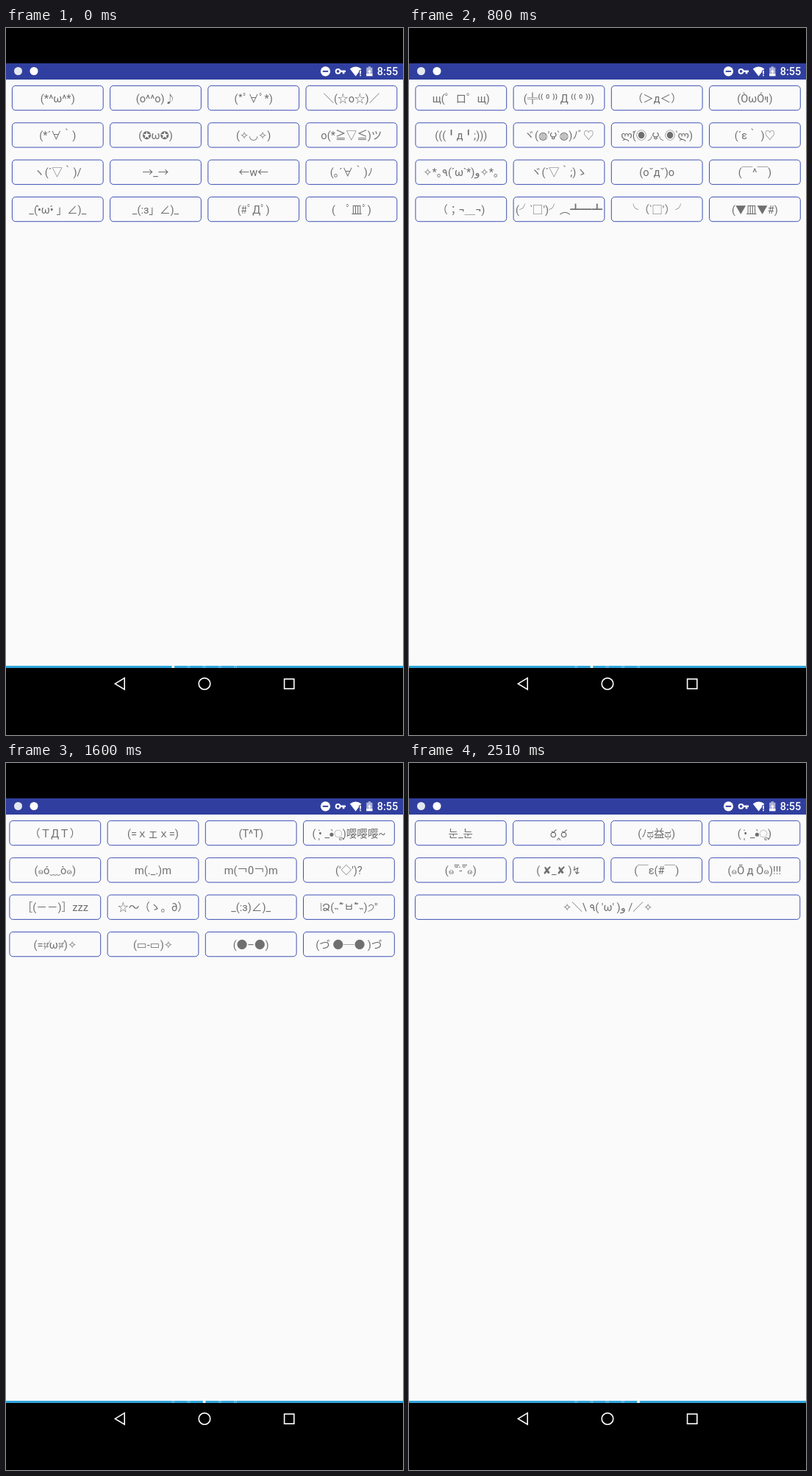
Animation of 540 by 960 pixels, one loop 2.54 s. Source, as an HTML page:

```html
<!DOCTYPE html>
<html lang="en">
<head>
<meta charset="utf-8">
<title>Emoticon pager</title>
<style>
  html, body { margin: 0; width: 100%; height: 100%; overflow: hidden; background: #000; }
  svg { display: block; width: 540px; height: 960px; }
  text { font-family: Roboto, "Noto Sans CJK JP", "Noto Sans CJK SC", "Noto Sans", "DejaVu Sans", sans-serif; }
  .face { font-size: 14.6px; fill: #6f6f70; text-anchor: middle; direction: ltr; unicode-bidi: bidi-override; white-space: pre; }
  .box { fill: none; stroke: #3f51b5; stroke-width: 1; }
  .dot { fill: none; stroke: #fff; stroke-width: .7; stroke-opacity: .55; }
  .dot.on { fill: #fff; stroke-opacity: 1; }
  .nav { fill: none; stroke: #fff; stroke-width: 1.6; }
</style>
</head>
<body>
<svg viewBox="0 0 540 960">
  <clipPath id="barClip"><rect y="866" width="540" height="3"/></clipPath>
  <rect width="540" height="960"/>
  <rect y="70" width="540" height="796" fill="#fafafa"/>
  <g id="pages"></g>

  <rect y="48" width="540" height="22" fill="#303f9f"/>
  <g fill="#fff">
    <circle cx="16.5" cy="58.5" r="5.5" fill="#e3e8ee"/>
    <circle cx="38" cy="58.5" r="5.5"/>
    <circle cx="434.5" cy="58.8" r="6.6"/>
    <rect x="430.8" y="57.9" width="7.4" height="1.9" fill="#303f9f"/>
    <path d="M454 57.6H462V60H460.4V62.2H457.8V60H454Z"/>
    <circle cx="451.6" cy="58.8" r="2.9" fill="none" stroke="#fff" stroke-width="2"/>
    <path d="M467.8 55.4Q475.6 49.8 483.4 55.4L475.6 65.4Z"/>
    <path d="M480 57.5H484.5V66H480Z" fill="#303f9f"/>
    <path d="M481.2 58h1.7v4.4h-1.7zM481.2 63.5h1.7v1.7h-1.7z"/>
    <path d="M492.6 52.3h3.4v1.5h2.4v11.4h-8.2V53.8h2.4z" fill="#acb2d9"/>
    <path d="M490.2 62h8.2v3.2h-8.2z"/>
    <path d="M494.8 55.4l-2.6 4.5h1.8v3l2.6-4.6h-1.8z"/>
    <text x="504.8" y="64" font-size="14.4" font-weight="500">8:55</text>
  </g>

  <rect y="866" width="540" height="3" fill="#2fa4dc"/>
  <g id="dots" clip-path="url(#barClip)"></g>
  <rect y="869" width="540" height="91"/>
  <g class="nav">
    <path d="M148.4 890.4L161.2 882.6V898.2Z"/>
    <circle cx="270" cy="890.4" r="7.8"/>
    <rect x="378.6" y="884" width="13.2" height="13.2"/>
  </g>
</svg>
<script>
const PAGES = [
  ["(*^ω^*)", "(o^^o)♪", "(*ﾟ∀ﾟ*)", "＼(☆o☆)／",
   "(*´∀｀)", "(✪ω✪)", "(✧◡✧)", "o(*≧▽≦)ツ",
   "ヽ(´▽｀)/", "→_→", "←w←", "(｡´∀｀)ﾉ",
   "_(•̀ω•́ 」∠)_", "_(:з」∠)_", "(#ﾟДﾟ)", "(　ﾟ皿ﾟ)"],
  ["щ(゜ロ゜щ)", "(╬⁽⁽ ⁰ ⁾⁾ Д ⁽⁽ ⁰ ⁾⁾)", "（＞д＜）", "(ÒωÓױ)",
   "(((╹д╹;)))", "ヾ(◍′౪‵◍)ﾉﾞ♡", "ლ(́◉\u200a◞౪◟\u200a◉‵ლ)", "(´ε｀ )♡",
   "✧*｡٩(ˊωˋ*)و✧*｡", "ヾ(´▽｀;)ゝ", "(o˘д˘)o", "(￣^￣)",
   "（；¬＿¬)", "(╯‵□′)╯︵┻━┻", "╰（‵□′）╯", "(▼皿▼#)"],
  ["（ＴДＴ）", "(=ｘェｘ=)", "(T^T)", "( •̩̇ _•̀ू)嘤嘤嘤~",
   "(๑ó﹏ò๑)", "m(._.)m", "m(￢0￢)m", "('◇')?",
   "［(－－)］zzz", "☆～（ゝ。∂）", "_(:з)∠)_", "⦚Ձ(˵˜̊ㅂ˜̊˵)੭″",
   "(=⌗̸ω⌗̸)✧", "(▭-▭)✧", "(●–●)", "(づ ●─● )づ"],
  ["｡ﾟ +.ღ(ゝ◡ ⚈́ღ)", "(›´ω`‹ )", "(  •˘ ³ •˘ )", "(๑°3°๑)",
   "=͟͟͞͞(꒪⌓꒪*)", "( ˘•ω•˘ )", "~( ´•︵•` )~", "o(〃'▽'〃)o",
   "(๑ŐϖŐ๑)", "(˶‾᷄ -̫ ‾᷅˶)", "(•ू⚈̂⌄⚈̂•ू)", "(σ▬˃ㅂ˂)σ✧",
   "((٩(//Д//)۶))", "(⁄ ⁄•⁄ω⁄•⁄ ⁄)", "ᕙ(⇀‸↼‶)ᕗ", "(˜(˜ő̆ )˜)ᵒᵐᵍᵎᵎᵎ"],
  ["눈_눈", "ర‸ర", "(ﾉಥ益ಥ)", "( •̩̇ _•̀ू)",
   "(๑‾̆-̈‾̆๑)", "( ✘_✘ )↯", "(￣ε(#￣)", "(๑Ō д Ō๑)!!!",
   "✧＼\\ ٩( 'ω' )و /／✧"]
];
const W = 540, LOOP = 2540, FPS = 35;
const DRAG = 3.3, RELEASE = 270;

// Times in ticks of 1/35 s: first tick, first offset, settle length
const SWIPES = [
  { at: 18, from: 17, settle: 9.4 },
  { at: 37, from: 17, settle: 10.7 },
  { at: 56, from: 3.4, settle: 9.7 },
  { at: 76, from: 7.3, settle: 8.7 }
];

const pages = document.getElementById("pages");
const dotBox = document.getElementById("dots");

function add(parent, tag, attrs, label) {
  const node = document.createElementNS("http://www.w3.org/2000/svg", tag);
  for (const key in attrs) node.setAttribute(key, attrs[key]);
  if (label) node.textContent = label;
  return parent.appendChild(node);
}

PAGES.forEach((faces, p) => {
  const page = add(pages, "g", { transform: `translate(${p * W} 0)` });
  faces.forEach((face, i) => {
    const x = 8.4 + (i % 4) * 133.2, y = 78.4 + (i >> 2) * 50.35;
    const width = faces.length === 9 && i === 8 ? 523.4 : 123.8;
    add(page, "rect", { class: "box", x, y, width, height: 33.3, rx: 4.5 });
    add(page, "text", { class: "face", x: x + width / 2, y: y + 22.3 }, face);
  });
});

const dots = PAGES.map((_, i) =>
  add(dotBox, "circle", { class: "dot", cx: 227.3 + i * 21.2, cy: 867.5, r: 1.6 }));

// Finger drag, then a quintic ease-out to the next page
function swipeOffset({ at, from, settle }, tick) {
  const k = tick - at;
  if (k < 0) return 0;
  if (k < DRAG) return from + (RELEASE - from) * (k / DRAG) ** 1.2;
  const u = Math.min(1, (k - DRAG) / settle);
  return W - (W - RELEASE) * (1 - u) ** 5;
}

function draw(ms) {
  const tick = Math.floor((ms % LOOP + 5) * FPS / 1000);
  const scroll = SWIPES.reduce((sum, s) => sum + swipeOffset(s, tick), 0);
  const active = SWIPES.filter(s => tick >= s.at + DRAG).length;
  pages.setAttribute("transform", `translate(${-Math.round(scroll * 2) / 2} 0)`);
  dots.forEach((dot, i) => dot.classList.toggle("on", i === active));
}

const start = performance.now();
function loop() {
  draw(performance.now() - start);
  requestAnimationFrame(loop);
}
loop();
</script>
</body>
</html>
```
